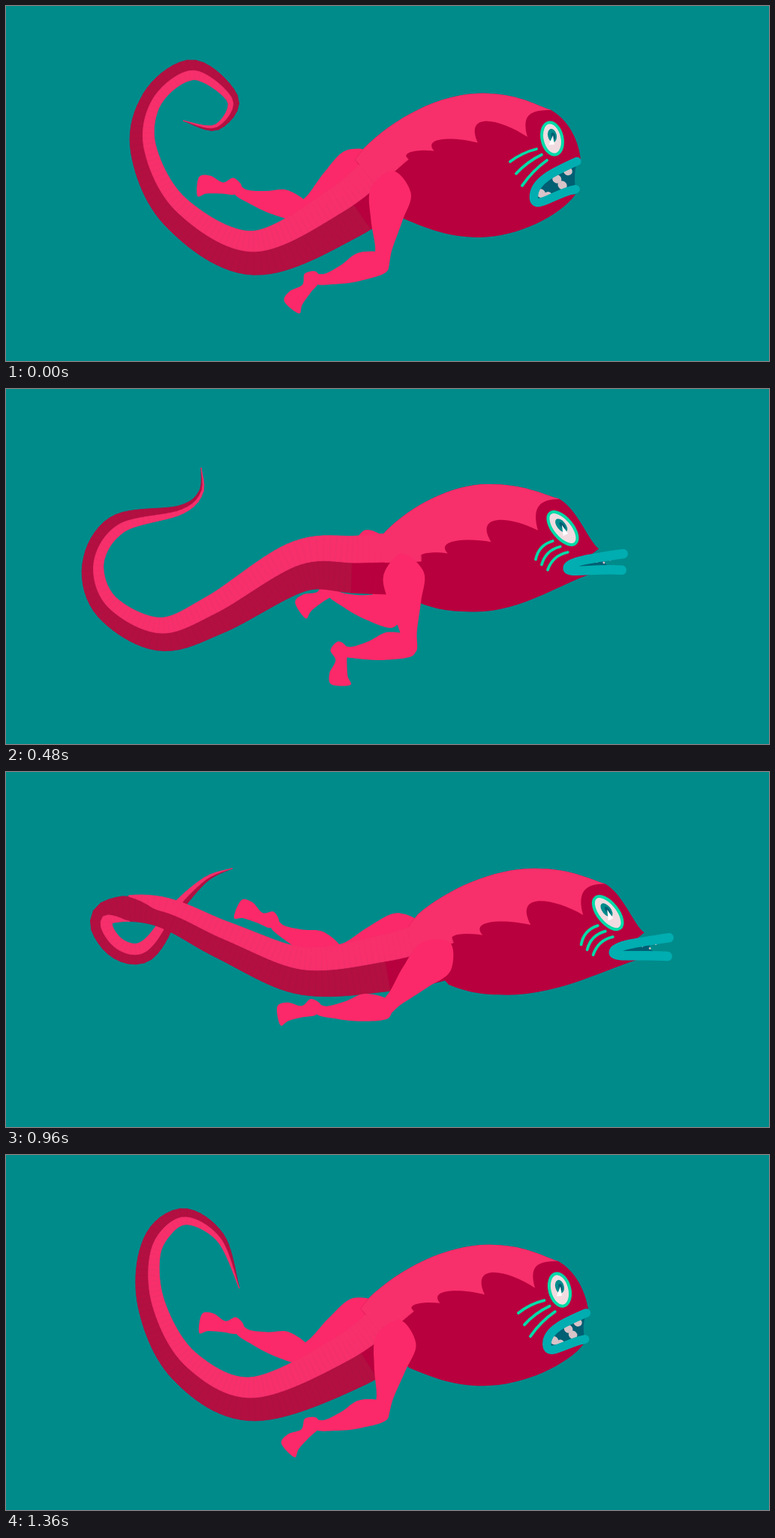
Animation, 1017 px wide and 474 px high, one loop 1440 ms. Source, as an HTML page with a canvas:

```html
<!DOCTYPE html>
<html lang="en">
<head>
<meta charset="utf-8">
<title>Running creature</title>
<style>
html, body { margin: 0; width: 100%; height: 100%; overflow: hidden; background: #008b8b; }
canvas { display: block; }
</style>
</head>
<body>
<canvas id="stage" width="1017" height="474"></canvas>
<script>
const ctx = document.getElementById('stage').getContext('2d');
const LOOP = 1440, STEP = 80, SEGS = 96;
const C = {
  water: '#008b8b', back: '#f72f6b', leg: '#fb2969', belly: '#b8003e', tail: '#b30f41',
  lip: '#00adb0', mouth: '#005f73', tooth: '#d8c3c8', ring: '#00dba8', white: '#f0dce0'
};

// Key values of each moving quantity; angles in degrees, clockwise from the right.
const TIMES = [0, 160, 320, 480, 800, 1120, 1360];
const TRACKS = {
  hip: [513, 505, 497, 530, 571, 562, 520],
  root: [205, 207, 211, 230, 235, 219, 209],
  eyeX: [728, 704, 691, 742, 801, 787, 738],
  eyeY: [177, 169, 169, 186, 191, 184, 180],
  open: [.2, .85, 1, 0, 0, .1, .17],
  pout: [0, 0, 0, .75, 1, .42, .04],
  nearThigh: [97, 73, 47, 85, 132, 126, 101],
  nearCalf: [168, 173, 179, 178, 183, 178, 170],
  nearFoot: [125, 128, 109, 87, 162, 156, 132],
  farThigh: [142, 122, 100, 72, 143, 168, 148],
  farCalf: [200, 196, 202, 205, 205, 211, 203],
  farFoot: [180, 165, 150, 142, 190, 198, 184],
  flip: [1.2, 1.2, 1.2, 1.2, .71, .67, 1.2]
};

// A few points along the tail for each key time, from body to tip.
const TAILS = [
  [450,274, 330,328, 228,275, 184,190, 197,122, 250,86, 302,125, 280,162, 236,153],
  [440,260, 315,301, 200,255, 162,185, 190,112, 245,96, 296,145, 268,211, 205,192, 178,115, 187,70, 178,42],
  [435,250, 260,270, 140,228, 95,155, 130,107, 185,98, 238,143, 233,176, 203,145, 194,92, 217,60],
  [470,232, 390,235, 280,299, 205,326, 135,290, 117,232, 150,181, 232,162, 260,138, 260,105],
  [520,244, 400,238, 285,226, 190,256, 146,335, 168,376, 222,345, 275,266],
  [495,263, 385,296, 285,245, 232,158, 195,104, 177,118, 205,168, 275,210, 294,270, 279,309],
  [460,272, 330,324, 240,282, 195,200, 195,122, 235,83, 285,110, 311,178]
];

const pairs = a => Array.from({ length: a.length / 2 }, (_, i) => [a[2 * i], a[2 * i + 1]]);
const clamp = (v, lo, hi) => Math.max(lo, Math.min(hi, v));
const add = (p, x, y) => [p[0] + x, p[1] + y];
const lerp = (a, b, t) => a.map((v, i) => v + (b[i] - v) * t);
const polar = (p, deg, r) => add(p, r * Math.cos(deg * Math.PI / 180), r * Math.sin(deg * Math.PI / 180));

function bezier(a, b, c, d, t) {
  const u = 1 - t;
  return a.map((v, i) => u * u * u * v + 3 * u * u * t * b[i] + 3 * u * t * t * c[i] + t * t * t * d[i]);
}

// Catmull-Rom spans as Bezier control points.
function spans(p, closed) {
  const n = p.length;
  const P = i => p[closed ? (i + n) % n : clamp(i, 0, n - 1)];
  return p.slice(closed ? 0 : 1).map((_, i) => {
    const [a, b, c, d] = [P(i - 1), P(i), P(i + 1), P(i + 2)];
    return [b, add(b, (c[0] - a[0]) / 6, (c[1] - a[1]) / 6), add(c, (b[0] - d[0]) / 6, (b[1] - d[1]) / 6), c];
  });
}

// Tail points become headings and step lengths, so the blend swings rather than slides.
function unroll(points) {
  const dense = [points[0]], at = [0];
  for (const s of spans(points)) for (let k = 1; k <= 20; k++) {
    const p = bezier(...s, k / 20), q = dense[dense.length - 1];
    at.push(at[at.length - 1] + Math.hypot(p[0] - q[0], p[1] - q[1]));
    dense.push(p);
  }
  const total = at[at.length - 1], head = [], step = [];
  let prev = points[0], last = Math.PI;
  for (let s = 1, j = 0; s <= SEGS; s++) {
    const d = total * s / SEGS;
    while (j < at.length - 2 && at[j + 1] < d) j++;
    const p = lerp(dense[j], dense[j + 1], Math.min(1, (d - at[j]) / (at[j + 1] - at[j])));
    const h = Math.atan2(p[1] - prev[1], p[0] - prev[0]);
    last = h + 2 * Math.PI * Math.round((last - h) / (2 * Math.PI));
    head.push(last);
    step.push(Math.hypot(p[0] - prev[0], p[1] - prev[1]));
    prev = p;
  }
  return [...head, ...step];
}

const tailRoot = (hip, root) => [hip + 23, root];
const unrolled = TAILS.map((t, k) => unroll([tailRoot(TRACKS.hip[k], TRACKS.root[k]), ...pairs(t)]));
const tailTracks = unrolled[0].map((_, c) => unrolled.map(u => u[c]));

// Smooth periodic curve through one track's key values.
function sample(keys, time) {
  const n = keys.length;
  let i = n - 1;
  while (TIMES[i] > time) i--;
  const at = j => (j + n) % n;
  const span = j => (TIMES[at(j + 1)] - TIMES[at(j)] + LOOP) % LOOP;
  const slope = j => (keys[at(j + 1)] - keys[at(j)]) / span(j);
  const tangent = j => (slope(j - 1) * span(j) + slope(j) * span(j - 1)) / (span(j - 1) + span(j));
  const h = span(i), t = (time - TIMES[i]) / h, s = t * t * (3 - 2 * t);
  return keys[i] * (1 - s) + keys[at(i + 1)] * s
    + h * t * (1 - t) * (tangent(i) * (1 - t) - tangent(i + 1) * t);
}

function fill(color) {
  ctx.fillStyle = color;
  ctx.fill();
}

function stroke(color, width) {
  ctx.strokeStyle = color;
  ctx.lineWidth = width;
  ctx.stroke();
}

const cubic = (a, b, c) => ctx.bezierCurveTo(...a, ...b, ...c);

function blob(p, rx, ry, color, turn = 0) {
  ctx.beginPath();
  ctx.ellipse(...p, rx, ry, turn, 0, 7);
  fill(color);
}

// Leg outlines: distance along the bone, distance to its side.
const THIGH = pairs([-27,0, 0,27, 40,22, 75,12, 102,8, 104,-8, 78,-11, 38,-20, 0,-27]);
const CALF = pairs([-4,11, 28,19, 54,8, 78,1, 93,4, 92,-10, 70,-15, 36,-18, -4,-13]);
const FOOT = pairs([-9,0, 2,11, 16,5, 33,14, 48,12, 50,-13, 38,-10, 18,-10, 0,-11]);

function bone(p, deg, shape) {
  ctx.save();
  ctx.translate(...p);
  ctx.rotate(deg * Math.PI / 180);
  ctx.beginPath();
  ctx.moveTo(...shape[0]);
  spans(shape, true).forEach(s => cubic(...s.slice(1)));
  fill(C.leg);
  ctx.restore();
}

function leg(hip, thigh, calf, foot) {
  const knee = polar(hip, thigh, 96), ankle = polar(knee, calf, 95);
  bone(hip, thigh, THIGH);
  bone(knee, calf, CALF);
  bone(ankle, foot, FOOT);
}

function tail(p, d, flip) {
  const head = d.slice(0, SEGS), step = d.slice(SEGS);
  const total = step.reduce((a, b) => a + b);
  const rows = [];
  let run = 0;
  for (let i = 0; i <= SEGS; i++) {
    const h = (head[Math.max(i - 1, 0)] + head[Math.min(i, SEGS - 1)]) / 2;
    const w = Math.max(0, Math.min(Math.max(44 - .058 * run, 14), .085 * (total - run)));
    const twist = clamp((flip - i / SEGS) / .05, -1, 1);
    const right = .92 * w, left = -1.04 * w;
    rows.push([right, right * (1 - Math.max(twist, 0)), left * (1 - Math.max(-twist, 0)), left]
      .map(o => add(p, -Math.sin(h) * o, Math.cos(h) * o)));
    if (i < SEGS) {
      p = add(p, Math.cos(head[i]) * step[i], Math.sin(head[i]) * step[i]);
      run += step[i];
    }
  }
  const strip = (i, a, b, color) => {
    const r = rows[i], s = rows[i + 1];
    ctx.beginPath();
    [r[a], s[a], s[b], r[b]].forEach(q => ctx.lineTo(...q));
    ctx.closePath();
    fill(color);
    stroke(color, .8);
  };
  // The tip lies behind, so draw towards the body.
  for (let i = SEGS - 1; i >= 0; i--) {
    const lit = flip > (i + .5) / SEGS ? 0 : 2;
    strip(i, 1, 2, i < SEGS * .12 ? C.belly : C.tail);
    strip(i, lit, lit + 1, C.back);
  }
}

// Every point of body and face follows from hip, eye, mouth opening and pout.
function shape(s) {
  const open = clamp(s.open, 0, 1), pout = clamp(s.pout, 0, 1), pull = Math.sqrt(pout);
  const hip = [s.hip, 247], eye = [s.eyeX, s.eyeY];
  const brow = add(eye, -4 + 13 * open, -39 + 5 * open);
  const upper = add(eye, 32 + 5 * open + 65 * pout, 34 - 18 * open);
  const lower = add(eye, 30 + 6 * open + 65 * pout, 58 + 48 * open - 3 * pout);
  return {
    open, pout, hip, eye, brow, upper, lower,
    corner: add(eye, -28 + 17 * open + 40 * pull, 80 - 10 * open - 31 * pull),
    crown: add(brow, -95 + 15 * open, -20 - 13 * open),
    nose: add(upper, 5 - 50 * pout, -3 - 5 * pout),
    jaw: add(lower, -45 * pout, 7 - 5 * pout),
    belly: add(hip, 118 - 30 * pout, 61 + 5 * open - 14 * pout),
    nape: add(hip, -36 + 16 * pout, -57),
    cheek: add(eye, -33, -4 + 9 * Math.max(open, pout)),
    root: tailRoot(s.hip, s.root)
  };
}

function backLine({ nape, crown, brow }) {
  const dx = crown[0] - nape[0], dy = crown[1] - nape[1];
  const ex = brow[0] - crown[0], ey = brow[1] - crown[1];
  ctx.beginPath();
  ctx.moveTo(...add(nape, -12, 15));
  ctx.lineTo(...nape);
  cubic(add(nape, .25 * dx, .54 * dy), add(crown, -.36 * dx, 0), crown);
  cubic(add(crown, .5 * ex, 0), add(brow, -.25 * ex, -.35 * ey), brow);
}

function body(b) {
  const { brow, nose, corner, jaw, belly, hip, pout } = b;
  const end = add(hip, 17, 37);
  backLine(b);
  cubic(add(brow, 24, 14), add(nose, -3 - 15 * pout, -25 + 19 * pout), nose);
  ctx.lineTo(...add(corner, 8, 0));
  ctx.lineTo(...jaw);
  cubic(add(jaw, -20 - 30 * pout, 28 - 23 * pout), add(belly, .4 * (jaw[0] - belly[0]), 0), belly);
  cubic(add(belly, .45 * (end[0] - belly[0]), 0), add(end, 25, 10), end);
  ctx.lineTo(...add(hip, -15, 0));
  fill(C.belly);
}

function backPatch(b) {
  const { brow, cheek, root, hip, open } = b;
  const cusps = [0, .4 + .08 * open, .77 + .06 * open, 1].map((t, i) =>
    add(lerp(cheek, root, t), 0, i % 3 ? -1 - 19 * open : 0));
  backLine(b);
  cubic(add(brow, -28, 0), add(cheek, -8, -30), cheek);
  for (let i = 0; i < 3; i++) {
    const p = cusps[i], q = cusps[i + 1], dx = q[0] - p[0], dy = q[1] - p[1], k = i ? .55 : 1;
    const off = (o, along, up) => add(o, dx * along - dy * up * k, dy * along + dx * up * k);
    cubic(off(p, .5, .43), off(q, .2, .66), q);
  }
  ctx.lineTo(...add(hip, -25, -15));
  fill(C.back);
}

function mouth({ upper, corner, lower, open, pout }) {
  const dx = corner[0] - upper[0], dy = corner[1] - upper[1];
  const top = [upper, add(upper, .55 * dx, .3 * dy), add(corner, 0, -.45 * dy), corner];
  const low = [corner, add(corner, 0, 20 - 16 * pout),
    add(lower, .5 * (corner[0] - lower[0]), 5 - 10 * pout), lower];
  const lips = () => {
    ctx.beginPath();
    ctx.moveTo(...upper);
    cubic(...top.slice(1));
    cubic(...low.slice(1));
  };
  const mid = lerp(upper, lower, .5), center = lerp(mid, corner, 1 / 3);
  lips();
  ctx.quadraticCurveTo(...add(mid, 5 - 45 * open - 70 * pout, 0), ...upper);
  fill(C.mouth);
  for (const [side, t] of [[top, .08], [top, .42], [low, .8], [low, .4], [low, 0]]) {
    const p = bezier(...side, t), x = center[0] - p[0], y = center[1] - p[1], k = 11 / (Math.hypot(x, y) + 1);
    blob(add(p, x * k, y * k), 6.3 * (1 - pout), 5.6 * (1 - pout), C.tooth, .6);
  }
  lips();
  stroke(C.lip, 10.5 + 4 * open + 10 * pout * (1 - pout));
}

function eyeball({ eye, open, pout }) {
  const rx = 15 + 2 * open, ry = 24.5 + 5 * pout - 3 * open;
  ctx.save();
  ctx.translate(...eye);
  ctx.rotate((-18 + 26 * open - 29 * pout) * Math.PI / 180);
  blob([0, 0], rx - 2, ry - 2, C.white);
  stroke(C.ring, 4);
  blob([1, -4], rx * .38, ry * .38, C.water);
  blob([2, -3], rx * .17, ry * .2, C.mouth);
  ctx.beginPath();
  ctx.moveTo(2, -4);
  ctx.lineTo(-rx * .4, ry * .3);
  ctx.lineTo(1, ry * .35);
  fill('#fff');
  ctx.restore();
}

function whiskers({ eye, open, pout }) {
  for (let i = 0; i < 3; i++) {
    const a = add(eye, -57 + 8 * i + 28 * pout + 5 * open, 28 + 16 * i + 14 * open + pout * (18 - 12 * i));
    const b = add(eye, -20 + 7 * i - 5 * open + pout * (9 + 4 * i), 14 + 7.5 * i + 4 * pout);
    const dx = b[0] - a[0], dy = b[1] - a[1], bow = (4 + 8 * pout) / Math.hypot(dx, dy);
    ctx.beginPath();
    ctx.moveTo(...a);
    ctx.quadraticCurveTo(...add(lerp(a, b, .5), dy * bow, -dx * bow), ...b);
    stroke(C.ring, 3.8);
  }
}

function draw(time) {
  const s = {};
  for (const name in TRACKS) s[name] = sample(TRACKS[name], time);
  const b = shape(s);
  ctx.fillStyle = C.water;
  ctx.fillRect(0, 0, 1017, 474);
  ctx.lineCap = ctx.lineJoin = 'round';
  leg(add(b.hip, -43, -33), s.farThigh, s.farCalf, s.farFoot);
  body(b);
  tail(b.root, tailTracks.map(k => sample(k, time)), s.flip);
  backPatch(b);
  mouth(b);
  eyeball(b);
  whiskers(b);
  leg(b.hip, s.nearThigh, s.nearCalf, s.nearFoot);
}

const start = performance.now();
function tick() {
  const t = (performance.now() - start) % LOOP;
  draw(Math.floor(t / STEP) * STEP);
  requestAnimationFrame(tick);
}
tick();
</script>
</body>
</html>
```
